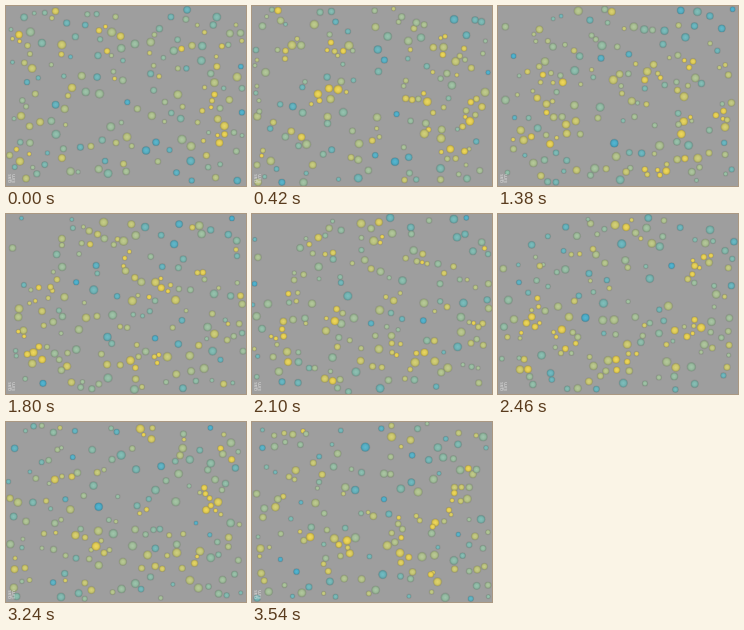
Write an HTML page with a canvas that moves like this. It is 240x180 px and loops after 3600 ms.

```html
<!DOCTYPE html>
<html lang="en">
<head>
<meta charset="utf-8">
<title>Particles</title>
<style>
html, body { margin: 0; width: 100%; height: 100%; overflow: hidden; background: #9e9e9e; }
canvas { position: absolute; left: 0; top: 0; width: 240px; height: 180px; }
.label {
  position: absolute; left: 1px; top: 177px; width: 13px;
  font: 5px/4px "DejaVu Sans", sans-serif; color: #dcdcdc;
  transform: rotate(-90deg); transform-origin: 0 0;
}
</style>
</head>
<body>
<canvas id="stage" width="240" height="180"></canvas>
<div class="label">gas<br>sim</div>
<script>
const W = 240, H = 180, STEP = 60, STEPS = 60, COUNT = 170, SUB = 3;
const ctx = document.getElementById('stage').getContext('2d');

let seed = 20117;
function rnd() {
  seed = (Math.imul(seed, 1664525) + 1013904223) >>> 0;
  return seed / 4294967296;
}

const parts = [];
function fill() {
  while (parts.length < COUNT) {
    const r = 2 + 2.4 * rnd();
    const x = r + rnd() * (W - 2 * r), y = r + rnd() * (H - 2 * r);
    if (parts.some(p => Math.hypot(p.x - x, p.y - y) < p.r + r + 1)) continue;
    const dir = rnd() * Math.PI * 2;
    const speed = (20 + 55 * rnd()) * 3 / r / 1000;
    parts.push({
      x, y, r, base: 0.2 + 0.65 * rnd(),
      vx: speed * Math.cos(dir), vy: speed * Math.sin(dir)
    });
  }
}

function collide(a, b) {
  const dx = b.x - a.x, dy = b.y - a.y, reach = a.r + b.r;
  const d2 = dx * dx + dy * dy;
  if (d2 >= reach * reach || d2 === 0) return;
  const d = Math.sqrt(d2), nx = dx / d, ny = dy / d;
  const closing = (a.vx - b.vx) * nx + (a.vy - b.vy) * ny;
  if (closing <= 0) return;
  const ma = a.r * a.r, mb = b.r * b.r, k = 2 * closing / (ma + mb);
  a.vx -= k * mb * nx; a.vy -= k * mb * ny;
  b.vx += k * ma * nx; b.vy += k * ma * ny;
}

function bounce(p) {
  if (p.x < p.r) p.vx = Math.abs(p.vx);
  if (p.x > W - p.r) p.vx = -Math.abs(p.vx);
  if (p.y < p.r) p.vy = Math.abs(p.vy);
  if (p.y > H - p.r) p.vy = -Math.abs(p.vy);
}

function advance(dt) {
  for (const p of parts) {
    p.x += p.vx * dt;
    p.y += p.vy * dt;
    bounce(p);
  }
  for (let i = 0; i < COUNT; i++)
    for (let j = i + 1; j < COUNT; j++) collide(parts[i], parts[j]);
}

// crowded particles turn yellow, lonely ones blue
function hueOf(p) {
  let crowd = -1;
  for (const q of parts) crowd += Math.exp(-((p.x - q.x) ** 2 + (p.y - q.y) ** 2) / 120);
  return Math.min(1, Math.max(0, p.base + 0.26 - 0.32 * crowd));
}

// yellow -> pale green -> blue
const ramp = [[230, 207, 84], [165, 191, 155], [78, 174, 202]];
function tint(hue, shade) {
  const i = hue < 0.5 ? 0 : 1, f = hue * 2 - i;
  const c = ramp[i].map((v, k) => Math.round((v + (ramp[i + 1][k] - v) * f) * shade));
  return `rgb(${c})`;
}

function disc(x, y, r, style) {
  ctx.fillStyle = style;
  ctx.beginPath();
  ctx.arc(x, y, r, 0, Math.PI * 2);
  ctx.fill();
}

function ball({ x, y, r, hue }) {
  const g = ctx.createRadialGradient(x, y, 0, x, y, r);
  g.addColorStop(0, tint(hue, 1.05));
  g.addColorStop(0.6, tint(hue, 0.98));
  g.addColorStop(1, tint(hue, 0.8));
  disc(x, y, r + 0.6, 'rgba(110,115,105,.22)');
  disc(x, y, r, g);
}

fill();
const poses = [];
for (let s = 0; s < STEPS; s++) {
  poses.push(parts.map(p => ({ x: p.x, y: p.y, r: p.r, hue: hueOf(p) })));
  for (let k = 0; k < SUB; k++) advance(STEP / SUB);
}

let shown = -1;
function draw(step) {
  if (step === shown) return;
  shown = step;
  ctx.fillStyle = '#9e9e9e';
  ctx.fillRect(0, 0, W, H);
  poses[step].forEach(ball);
}

const start = performance.now();
function tick() {
  draw(Math.floor((performance.now() - start) / STEP) % STEPS);
  requestAnimationFrame(tick);
}
tick();
</script>
</body>
</html>
```
